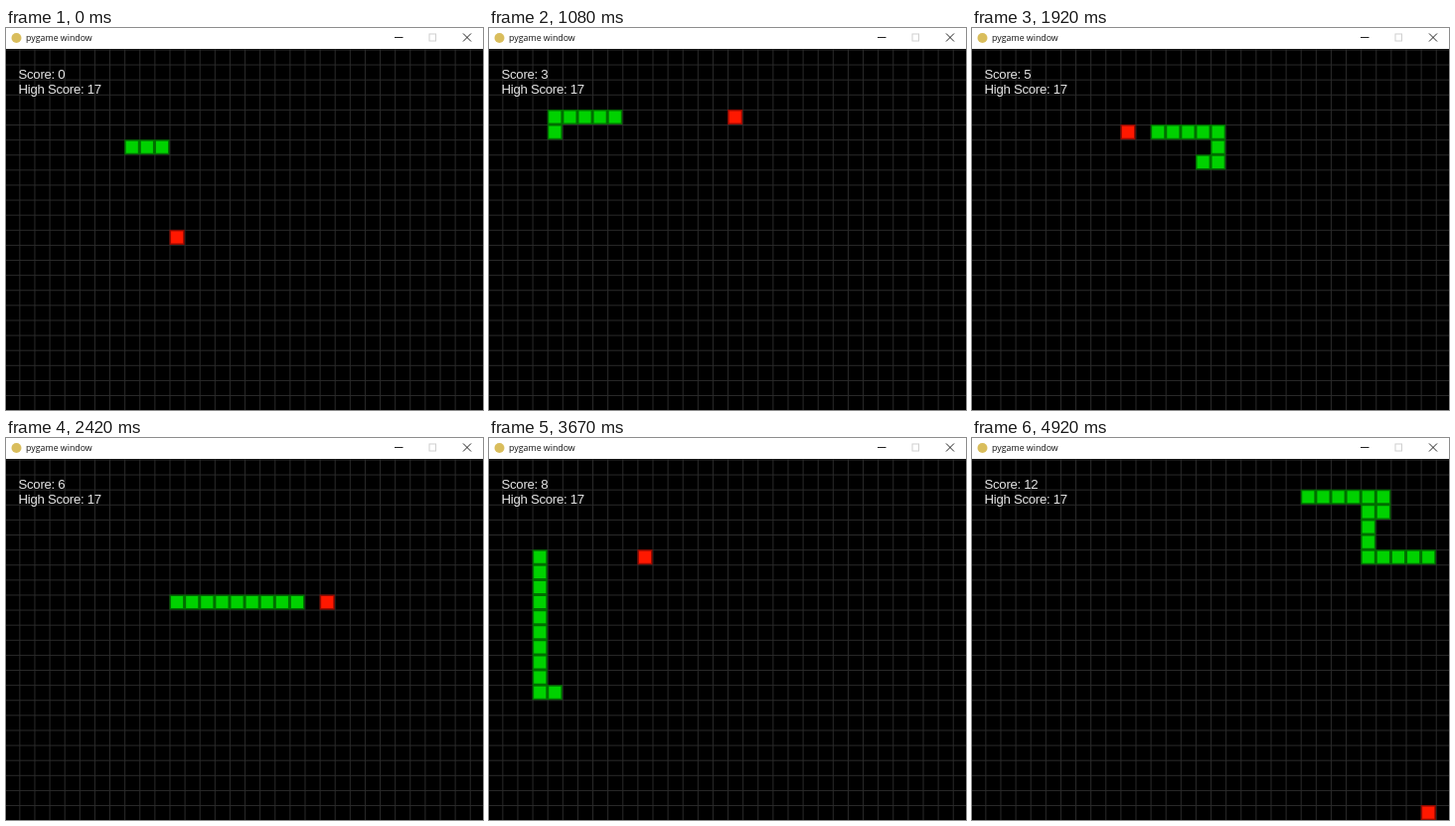
Animation of 480x384 px, one loop 5.01 s. Source, as an HTML page:

```html
<!DOCTYPE html>
<html lang="en">
<head>
<meta charset="utf-8">
<title>Snake</title>
<style>
  html, body { margin: 0; width: 100%; height: 100%; overflow: hidden; background: #000; }
  svg { display: block; }
  .title { font: 8.8px "Open Sans", "Noto Sans", sans-serif; fill: #111; }
  .hud { font: 13.2px "Liberation Sans", Arial, sans-serif; letter-spacing: -.28px; fill: #e6e6e6; }
</style>
</head>
<body>
<svg width="480" height="384" viewBox="0 0 480 384">
  <rect width="480" height="384"/>

  <!-- board in 20-unit cells -->
  <g transform="translate(-1.7 21.5) scale(.7556)">
    <path id="grid" fill="none" stroke="#2b2b2b" stroke-width="1.3"/>
    <path id="foodEdge" fill="#960a00"/>
    <path id="food" fill="#ff1800"/>
    <path id="bodyEdge" fill="#006e00"/>
    <path id="body" fill="#00d200"/>
  </g>
  <text class="hud" x="12.5" y="51.2" id="score">Score: 0</text>
  <text class="hud" x="12.5" y="66.2">High Score: 17</text>

  <!-- window bar -->
  <rect width="480" height="21" fill="#fff"/>
  <circle cx="10.5" cy="10" r="5" fill="#d9bd5c"/>
  <text class="title" x="20.1" y="13.2">pygame window</text>
  <g fill="none" stroke="#222">
    <path d="M391 9.5H399.5"/>
    <rect x="426" y="6" width="6.5" height="7" stroke="#d0d0d0"/>
    <path d="M460 5.5L468 13.5M468 5.5L460 13.5"/>
  </g>
</svg>
<script>
const LOOP = 5010, FRAME = 250 / 3, LAST = 59;
const STEPS_PER_FRAME = 2.48, PHASE = 0.4;
const CELL = 20, COLS = 32, ROWS = 24;

const route = "R1D7L9U8R2U1R12D5L2U1R1U1R1U2L6D4R11U1L4" +
  "D1L1".repeat(6) + "D1L8U9R7U1R12U3R5D1L1D3R4";
const foods = [[11, 12], [2, 13], [4, 5], [16, 4], [14, 9], [10, 5], [21, 9],
  [3, 15], [10, 6], [22, 5], [25, 2], [26, 6], [30, 23]];
const dirs = { R: [1, 0], L: [-1, 0], U: [0, -1], D: [0, 1] };

// trail holds every cell the head visits; scores[n] is the score after n steps
const trail = [[8, 6], [9, 6], [10, 6]];
const scores = [0];
for (const [, dir, count] of route.matchAll(/([RLUD])(\d+)/g)) {
  for (let i = 0; i < +count; i++) {
    const [x, y] = trail[trail.length - 1];
    const head = [x + dirs[dir][0], y + dirs[dir][1]];
    const score = scores[scores.length - 1];
    const [fx, fy] = foods[score];
    trail.push(head);
    scores.push(score + (head[0] === fx && head[1] === fy ? 1 : 0));
  }
}

const el = id => document.getElementById(id);
const squares = (cells, inset) => cells.map(([x, y]) => {
  const size = CELL - 2 * inset;
  return `M${x * CELL + inset} ${y * CELL + inset}h${size}v${size}h${-size}z`;
}).join("");

function drawCells(id, cells) {
  el(id + "Edge").setAttribute("d", squares(cells, 0));
  el(id).setAttribute("d", squares(cells, 2));
}

function drawGrid() {
  let d = "";
  for (let c = 0; c <= COLS; c++) d += `M${c * CELL + 0.6} 0v${ROWS * CELL}`;
  for (let r = 0; r <= ROWS; r++) d += `M0 ${r * CELL + 0.6}h${COLS * CELL}`;
  el("grid").setAttribute("d", d);
}

let shown = -1;
function draw(now) {
  const t = Math.floor((now % LOOP) / 10) * 10;
  const frame = Math.min(LAST, Math.floor((t + 5) / FRAME));
  if (frame !== shown) {
    shown = frame;
    const n = Math.floor(frame * STEPS_PER_FRAME + PHASE);
    const score = scores[n];
    drawCells("body", trail.slice(n - score, n + 3));
    drawCells("food", [foods[score]]);
    el("score").textContent = "Score: " + score;
  }
}

drawGrid();
const start = performance.now();
function tick() {
  draw(performance.now() - start);
  requestAnimationFrame(tick);
}
tick();
</script>
</body>
</html>
```
